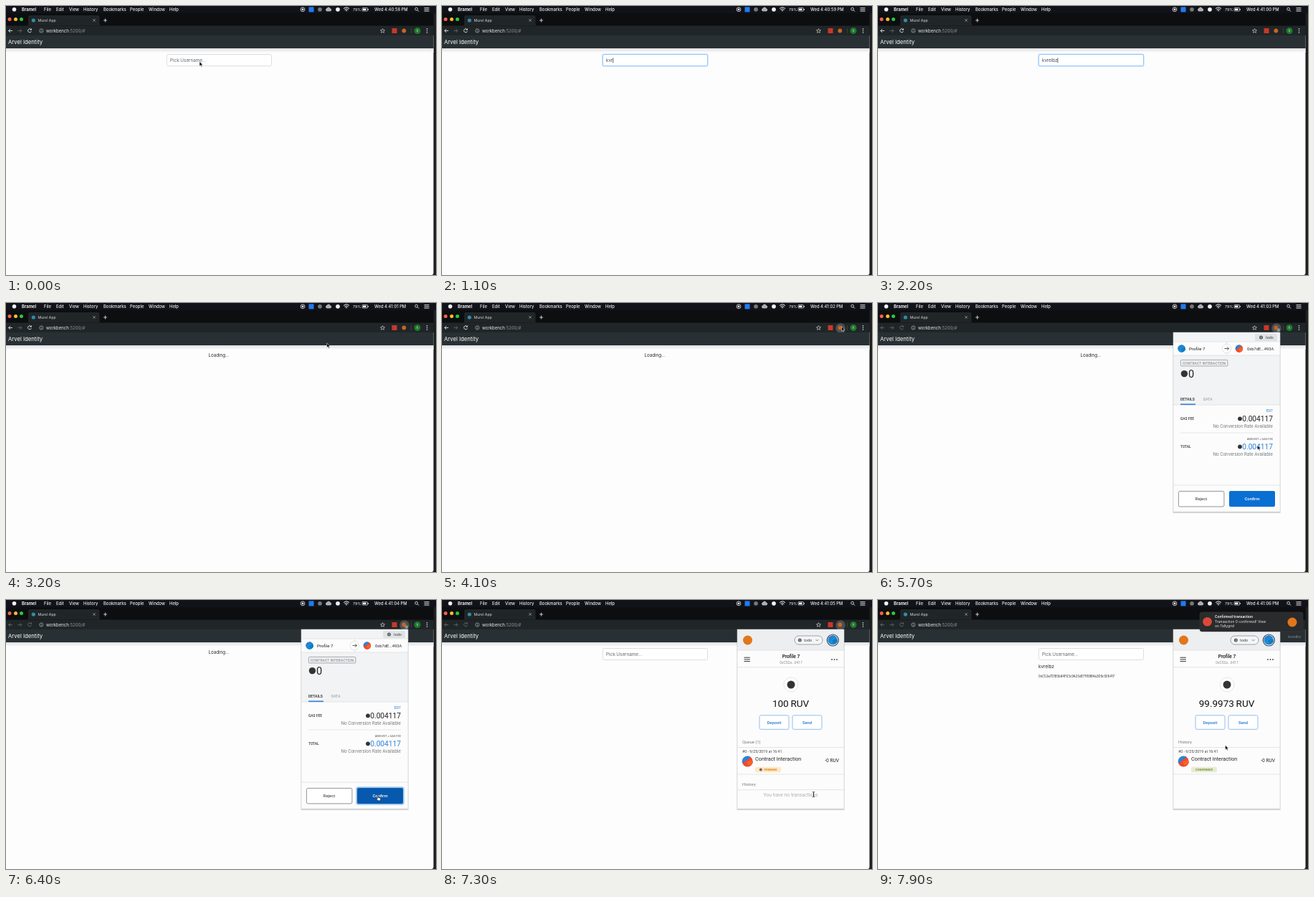
Animation, 600 px wide and 375 px high, one loop 8 s. Source, as an HTML page:

```html
<!DOCTYPE html>
<html lang="en">
<head>
<meta charset="utf-8">
<title>Wallet sign-up</title>
<style>
  html, body { margin: 0; width: 100%; height: 100%; overflow: hidden; background: #fdfdfd; }
  svg { display: block; width: 100%; height: 100%; }
  text { font-family: Inter, sans-serif; white-space: pre; }
  .wallet text { font-family: Roboto, sans-serif; }
</style>
</head>
<body>
<svg id="stage" viewBox="0 0 600 375" xmlns="http://www.w3.org/2000/svg"></svg>
<script>
const LOOP = 8000, STEP = 100, PAGE_RIGHT = 596.5;
const USER = 'kvrelbz', HOST = 'workbench', PROFILE = 'Profile 7', COIN = 'RUV';
const ADDRESS = '0xC52a7D1E0b84F63c9A25dE71f08B4a3D9c5E6417';

// Drawing helpers
const text = (x, y, size, str, fill = '#222', more = '') =>
  `<text x="${x}" y="${y}" font-size="${size}" fill="${fill}" ${more}>${str}</text>`;
const rect = (x, y, w, h, fill, more = '') =>
  `<rect x="${x}" y="${y}" width="${w}" height="${h}" fill="${fill}" ${more}/>`;
const circle = (x, y, r, fill, more = '') =>
  `<circle cx="${x}" cy="${y}" r="${r}" fill="${fill}" ${more}/>`;
const path = (d, stroke, width = 1, fill = 'none') =>
  `<path d="${d}" stroke="${stroke}" stroke-width="${width}" fill="${fill}"/>`;
const rule = (x1, x2, y, color = '#d9dbdd') => path(`M${x1} ${y}H${x2}`, color, .7);
const layer = (id, body, more = '') => `<g id="${id}" ${more}>${body}</g>`;
const END = 'text-anchor="end" ', MID = 'text-anchor="middle" ';
const BOLD = 'font-weight="700"', MEDIUM = 'font-weight="500"';

let clipCount = 0;
function avatar(x, y, r, base, patch, spot) {
  const id = 'clip' + clipCount++;
  return `<clipPath id="${id}">${circle(x, y, r, '#000')}</clipPath><g clip-path="url(#${id})">` +
    circle(x, y, r, base) +
    rect(x - r, y - r * 1.3, r * 2, r, patch, `transform="rotate(-38 ${x} ${y})"`) +
    rect(x - r * .2, y, r, r * .8, spot, `transform="rotate(-25 ${x} ${y})"`) + '</g>';
}
const blueAvatar = (x, y, r) => avatar(x, y, r, '#178fd6', '#2b7fd0', '#1a78ba');
const redAvatar = (x, y, r) => avatar(x, y, r, '#f0492c', '#2585d8', '#f5622c');

function menuBar() {
  const items = [['File', 53], ['Edit', 70], ['View', 88], ['History', 108],
    ['Bookmarks', 136], ['People', 173], ['Window', 199], ['Help', 228]];
  const white = '#f2f2f2';
  return rect(0, 0, 600, 10, '#11121a') +
    circle(11.5, 4.7, 2.8, white) +
    text(22, 7, 5.9, 'Bramel', white, BOLD) +
    items.map(([s, x]) => text(x, 7, 5.9, s, white, MEDIUM)).join('') +
    circle(414, 4.8, 2.9, 'none', `stroke="${white}" stroke-width=".8"`) + circle(414, 4.8, 1.4, white) +
    rect(422.5, 1.4, 7, 7, '#1f7cf2') +
    circle(438, 4.8, 2.9, '#777') +
    path('M447.5 7H452a1.6 1.6 0 0 0 .3-3.2a2.3 2.3 0 0 0-4.4-.2A1.8 1.8 0 0 0 447.5 7Z', white, .6, '#aaa') +
    circle(463, 4.8, 2.9, white) +
    path('M471 3.7q4-3.6 8 0M472.4 5.3q2.6-2.3 5.2 0M473.9 6.8q1.1-.9 2.2 0', white, 1) +
    text(484, 7, 5.4, '79%', white) +
    rect(497, 2.6, 7.5, 4.4, 'none', `stroke="${white}" stroke-width=".7" rx=".8"`) +
    rect(498, 3.6, 4.5, 2.4, white) + rect(505, 4, .8, 1.7, white) +
    `<text id="clock" x="514" y="7" font-size="5.8" fill="${white}" font-weight="500"></text>` +
    circle(572.6, 4.2, 1.9, 'none', `stroke="${white}" stroke-width=".8"`) + path('M574 5.6l2 2', white, .9) +
    path('M583.5 2.7H590.5M583.5 4.9H590.5M583.5 7.1H590.5', white, .9);
}

function browser() {
  const lights = [['#ff5f57', 5], ['#febc2e', 13.5], ['#28c840', 21.5]];
  return rect(0, 10, 600, 365, '#1d1f20') +
    rect(0, 10, PAGE_RIGHT, 18, '#0c0e0f') +
    lights.map(([c, x]) => circle(x, 18.5, 2.5, c)).join('') +
    path('M29 27.6q2 0 2-2V15.5q0-2.5 2.5-2.5H128q2.5 0 2.5 2.5V25.6q0 2 2 2Z', 'none', 0, '#202528') +
    circle(38.3, 20, 2.6, '#2f8fa8') +
    text(44.5, 22, 5.2, 'Murel App', '#d5d8da') +
    path('M121.3 18.2l3.4 3.4m0-3.4l-3.4 3.4', '#b5b8ba', .7) +
    path('M136 20h5M138.5 17.5v5', '#d5d8da', .9) +
    rect(0, 27.5, PAGE_RIGHT, 14, '#202528') +
    layer('navIcons', path('M9 34.5H3.7M6.1 32l-2.5 2.5l2.5 2.5', '#e6e8e9', .9) +
      path('M35 32.7a2.5 2.5 0 1 0 .4 2.5M35.4 31.5v1.8h-1.9', '#e6e8e9', .9)) +
    path('M16.5 34.5h5.3M19.4 32l2.5 2.5l-2.5 2.5', '#5f6467', .9) +
    circle(49.3, 34.5, 2.6, 'none', 'stroke="#b5b8ba" stroke-width=".7"') +
    path('M49.3 34v2.1M49.3 32.7v.7', '#b5b8ba', .7) +
    `<text x="56" y="36.7" font-size="6" fill="#eceeef">${HOST}<tspan fill="#8f9497">:5200/#</tspan></text>` +
    path('M525.5 31.6l.9 2 2.1.2-1.6 1.4.5 2.1-1.9-1.1-1.9 1.1.5-2.1-1.6-1.4 2.1-.2Z', '#d5d8da', .7) +
    rect(538.5, 31, 7, 7, '#c9382a') +
    layer('extHover', circle(556, 35, 6.8, '#4a4f52')) +
    circle(555.3, 34.5, 2.9, '#c8641f') +
    layer('badge', rect(556.5, 35.5, 4.5, 4.5, '#7a8288', 'rx="1"') + text(558.7, 39.2, 3.8, '1', '#fff', MID)) +
    path('M565.5 31v7', '#44494c', .7) +
    circle(574, 34.5, 4.5, '#1f7a2c') + text(574, 36.2, 4.6, 'k', '#c8e2ca', MID) +
    [31.9, 34.5, 37.1].map(y => circle(587.5, y, .8, '#d5d8da')).join('');
}

function page() {
  const field = stroke =>
    rect(224.3, 67.5, 146.2, 16, '#fff', `rx="2" stroke="${stroke}" stroke-width=".8"`);
  return path(`M0 41H${PAGE_RIGHT}V372q0 3-3 3H0Z`, 'none', 0, '#fdfdfd') +
    rect(0, 59, PAGE_RIGHT, 6, 'url(#shade)') +
    rect(0, 41, PAGE_RIGHT, 18, '#283034') +
    text(3, 53.4, 7.7, 'Arvel Identity', '#fff') +
    layer('plainField', field('#d3d6d9')) +
    layer('focusField', rect(223.3, 66.5, 148.2, 18, '#b9d9fb', 'rx="3"') + field('#80bdff')) +
    layer('placeholder', text(229, 77.9, 6.3, 'Pick Username...', '#5c6369')) +
    layer('entry', `<text id="typed" x="229" y="77.9" font-size="6.2" fill="#41474c"></text>` +
      `<path id="caret" d="M0 72.3V79.3" stroke="#222" stroke-width=".7"/>`) +
    layer('loading', text(297, 75, 6.2, 'Loading...', '#212529', MID)) +
    layer('registered', text(224, 95.2, 6.3, USER, '#212529') +
      text(224, 108.3, 4.25, ADDRESS, '#212529') +
      text(590, 53, 5.2, USER, '#8a9093', END));
}

function helpDot(x, y) {
  return circle(x, y, 2.5, '#5b6066') + text(x, y + 1.5, 4.2, '?', '#fff', MID);
}
const card = body =>
  rect(411.5, 41, 150, 252, '#000', 'opacity=".16"') + rect(412, 41, 149, 250, '#fcfcfc') + body +
  rect(412, 41, 149, 250, 'none', 'stroke="#d0d2d4" stroke-width=".6"');

function confirmCard() {
  const amount = (y, color) => circle(505, y - 3.7, 2.9, '#333') +
    text(551, y, 10.2, '0.004117', color, END) +
    text(551, y + 8.7, 6.4, 'No Conversion Rate Available', '#7b7f83', END);
  return card(rect(412, 41, 149, 13, '#f2f3f4') +
    rect(526, 43, 31, 10, '#e0e3e5', 'rx="1.5"') + helpDot(534.5, 48) + text(541, 50, 5.4, 'todo', '#444') +
    rule(412, 561, 54) + blueAvatar(423.7, 63.6, 5.4) + text(434, 66, 6.1, PROFILE) +
    path('M486.5 54V73', '#d4d7d9', .7) +
    circle(486.5, 63.5, 6.3, '#fff', 'stroke="#d4d7d9" stroke-width=".7"') +
    path('M483.5 63.5h5.8M487.2 61.3l2.2 2.2l-2.2 2.2', '#333', .8) +
    redAvatar(504, 63.6, 5.4) + text(515, 66, 5.8, '0xb7dE...493A') +
    rect(412, 73, 149, 69, '#f2f3f4') + rule(412, 561, 73) + rule(412, 561, 142) +
    rect(422.4, 79.4, 65.4, 8.5, 'none', 'stroke="#85898d" stroke-width=".7" rx="1"') +
    text(455, 85.5, 5.2, 'CONTRACT INTERACTION', '#777b80', MID) +
    circle(427.4, 98.6, 4.7, '#333') + text(433, 104, 14.5, '0') +
    text(422, 135.8, 5.1, 'DETAILS', '#222', MEDIUM) + text(454, 135.8, 5.1, 'DATA', '#888c90') +
    rect(422, 140.5, 21, 1.6, '#2f80dc') +
    text(551, 152, 4.6, 'EDIT', '#2f80dc', END) +
    text(422, 163, 4.9, 'GAS FEE', '#333', MEDIUM) + amount(165, '#222') + rule(422, 551, 181) +
    text(551, 191.2, 4, 'AMOUNT + GAS FEE', '#555', END) +
    text(422, 202.3, 4.9, 'TOTAL', '#333', MEDIUM) + amount(204, '#2f80dc') +
    rule(412, 561, 254) +
    rect(419.4, 262.4, 63.5, 21.5, '#fff', 'rx="2" stroke="#85898d" stroke-width=".9"') +
    text(451, 275.2, 5.9, 'Reject', '#555', MID + MEDIUM) +
    layer('ring', rect(488.3, 260.3, 67.4, 25.4, '#9cc6f3', 'rx="3"')) +
    rect(490, 262, 64, 22, '#0a6fd3', 'rx="2" id="confirm"') +
    text(522, 275.2, 5.9, 'Confirm', '#fff', MID + MEDIUM));
}

function accountCard() {
  const button = (x, label) =>
    rect(x, 160.8, 41, 19.5, '#fff', 'rx="2" stroke="#86b9f0" stroke-width=".9"') +
    text(x + 20.5, 172.5, 5.8, label, '#1f74d8', MID + MEDIUM);
  const balance = (id, n) => layer(id, text(486.5, 149, 13.5, `${n}&thinsp;${COIN}`, '#111', MID));
  const heading = (y, s) => text(419, y, 5.9, s, '#73777b');
  return card(rect(412, 41, 149, 29, '#eceeef') + rule(412, 561, 70) +
    circle(426.5, 56, 6.5, '#e2761b') +
    rect(492, 50, 39, 12, '#f4f5f6', 'rx="6" stroke="#7d8185" stroke-width=".7"') +
    helpDot(499.3, 56) + text(505, 58, 5.5, 'todo', '#444') + path('M521.5 55l2 2l2-2', '#555', .7) +
    circle(545.3, 56, 8, '#fff', 'stroke="#27465f" stroke-width="1.2"') + blueAvatar(545.3, 56, 6.8) +
    path('M421.5 80.2h8.3M421.5 82.9h8.3M421.5 85.6h8.3', '#333', 1) +
    text(487, 81.2, 6.6, PROFILE, '#111', MID + MEDIUM) +
    text(487, 89, 4.9, '0xC52a...6417', '#8b8f93', MID) +
    [544, 547.5, 551].map(x => circle(x, 83, .9, '#444')).join('') + rule(412, 561, 93.7) +
    circle(487, 118, 10, '#fff', 'stroke="#d9dcde" stroke-width=".7"') + circle(487, 118, 5.5, '#343434') +
    balance('before', '100') + balance('after', '99.9973') +
    button(443, 'Deposit') + button(489, 'Send') +
    rule(412, 561, 205.5) + text(419, 213.2, 5.25, '#0 - 9/25/2019 at 16:41', '#444') +
    redAvatar(426.3, 225.2, 7.6) + text(437, 224, 7.3, 'Contract Interaction') +
    text(554, 226, 6.6, `-0 ${COIN}`, '#222', END) + rule(412, 561, 243) +
    layer('pending', heading(200, 'Queue (1)') +
      rect(437, 232.8, 36, 7.4, '#ffe8c4', 'rx="2"') + circle(444.8, 236.5, 2, '#6b6a62') +
      text(449.5, 238, 4.2, 'PENDING', '#dd7f1c', BOLD) +
      heading(259, 'History') + rule(412, 561, 264.7) +
      text(486.5, 274, 6.8, 'You have no transactions', '#adb1b4', MID)) +
    layer('confirmed', heading(200, 'History') + rect(437, 232.8, 36, 7.4, '#e7ecd2', 'rx="2"') +
      text(455, 238, 4.4, 'CONFIRMED', '#64872c', MID + MEDIUM)));
}

function notice() {
  return rect(449, 17, 144, 27, '#2a2b2d', 'rx="3" stroke="#3a3b3d" stroke-width=".5"') +
    circle(459.5, 30.3, 6.3, '#db4a39') + circle(578, 31, 6.5, '#e2761b') +
    text(470, 25.2, 4.9, 'Confirmed transaction', '#fff', 'font-weight="600"') +
    text(470, 32, 4.95, 'Transaction 0 confirmed! View', '#e8e8e8') +
    text(470, 38.3, 4.95, 'on Tallygrid', '#e8e8e8');
}

// Each pointer shape has its hot spot at 0,0
const pointers =
  layer('arrow', path('M0 0V6.2L1.5 4.9L2.6 7.3L3.7 6.8L2.6 4.5H4.6Z', '#fff', .5, '#000')) +
  layer('beam', path('M-1.5-3.5Q0-3.5 0-2.5V2.5Q0 3.5-1.5 3.5M1.5-3.5Q0-3.5 0-2.5M0 2.5Q0 3.5 1.5 3.5', '#111', .9)) +
  layer('hand', path('M-.7 0q.7-.8 1.4 0V2.6l2.6.6q.6.2.5.9L3.2 6.8H0L-2.1 4.1q0-1 1.4-.2Z', '#111', .6, '#fff'));

const stage = document.getElementById('stage');
stage.innerHTML =
  `<defs><linearGradient id="shade" x2="0" y2="1"><stop stop-color="#dfdfe2"/>` +
  `<stop offset="1" stop-color="#fdfdfd"/></linearGradient></defs>` +
  browser() + page() + menuBar() +
  layer('confirmView', confirmCard(), 'class="wallet"') +
  layer('accountView', accountCard(), 'class="wallet"') +
  layer('notice', notice()) + layer('pointer', pointers);
const $ = id => document.getElementById(id);

// Visible spans in ms: from, to, from, to ...
const SPANS = {
  plainField: [0, 300, 7000, LOOP], focusField: [300, 2900],
  placeholder: [0, 700, 7000, LOOP], entry: [300, 2900],
  loading: [2900, 7000], registered: [7700, LOOP],
  extHover: [4000, LOOP], badge: [4700, 6800],
  confirmView: [4700, 6800], ring: [6400, 6800], accountView: [6800, LOOP],
  before: [6800, 7700], after: [7700, LOOP],
  pending: [6800, 7700], confirmed: [7700, LOOP], notice: [7500, LOOP],
  arrow: [0, 200, 2700, 6000, 7400, LOOP], beam: [200, 700, 6800, 7400], hand: [6000, 6800]
};
const KEY_TIMES = [700, 900, 1100, 1300, 1500, 1700, 2000];
const POINTER = [[0, 270, 77.5], [2700, 270, 77.5], [3500, 530, 46], [4000, 557.5, 33], [4600, 557.5, 33],
  [5000, 543, 106.5], [5400, 536, 150], [6100, 519, 273], [6400, 519, 273], [6800, 518.5, 271],
  [7300, 518.5, 271], [7800, 484.5, 202.5], [LOOP, 484.5, 202.5]];
const ease = p => p * p * (3 - 2 * p);

function visible(spans, t) {
  return spans.some((from, i) => i % 2 === 0 && t >= from && t < spans[i + 1]);
}
function pointerAt(t) {
  const i = POINTER.findIndex(k => k[0] > t);
  const [t0, x0, y0] = POINTER[i - 1], [t1, x1, y1] = POINTER[i];
  const p = ease((t - t0) / (t1 - t0));
  return `translate(${x0 + (x1 - x0) * p} ${y0 + (y1 - y0) * p})`;
}

function render(t) {
  for (const id in SPANS) $(id).style.display = visible(SPANS[id], t) ? '' : 'none';
  const seconds = 58 + Math.floor((t + 100) / 1000);
  const minutes = 40 + Math.floor(seconds / 60);
  $('clock').textContent = `Wed 4:${minutes}:${String(seconds % 60).padStart(2, '0')} PM`;
  const typed = USER.slice(0, KEY_TIMES.filter(k => k <= t).length);
  $('typed').textContent = typed;
  const width = typed && visible(SPANS.entry, t) ? $('typed').getComputedTextLength() : 0;
  $('caret').setAttribute('transform', `translate(${229.5 + width} 0)`);
  $('navIcons').setAttribute('opacity', t >= 4700 ? .35 : 1);
  $('confirm').setAttribute('fill', t >= 6000 ? '#0759ae' : '#0a6fd3');
  const slide = 1 - ease(Math.min(1, Math.max(0, (t - 7400) / 400)));
  $('notice').setAttribute('transform', `translate(${152 * slide} 0)`);
  $('pointer').setAttribute('transform', pointerAt(t));
}

const start = performance.now();
function tick() {
  const t = (performance.now() - start) % LOOP;
  render(Math.floor(t / STEP) * STEP);
  requestAnimationFrame(tick);
}
tick();
</script>
</body>
</html>
```
